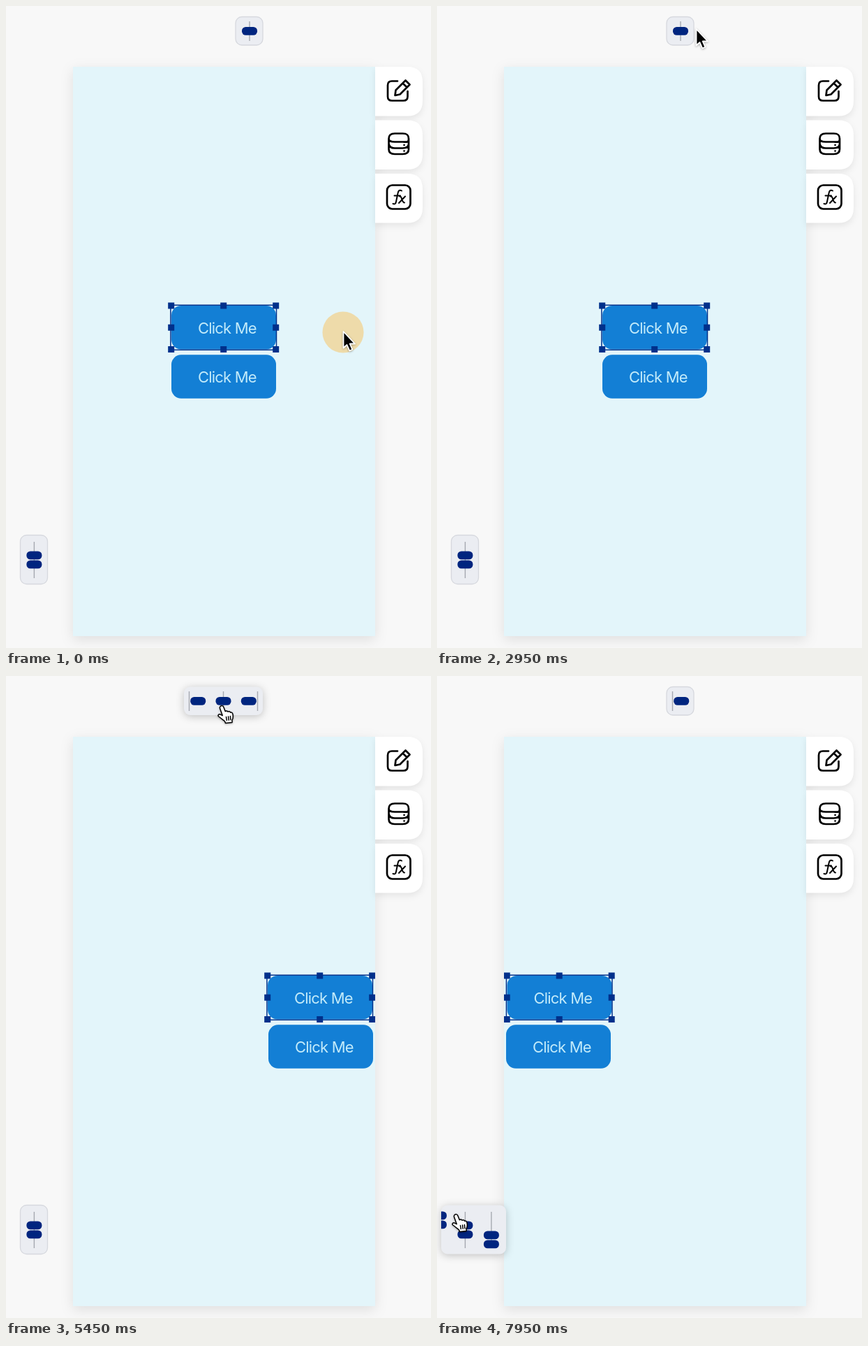
An HTML page that plays this animation: 609x919 px, repeating every 8000 ms.

```html
<!DOCTYPE html>
<html lang="en">
<head>
<meta charset="utf-8">
<style>
  html, body { margin: 0; width: 100%; height: 100%; overflow: hidden; background: #f8f8f8; }
  svg { display: block; width: 609px; height: 919px; }
  text { font: 22px Inter, Roboto, sans-serif; letter-spacing: -.8px; fill: #c3ebfa; }
  .page { fill: #e3f5fa; filter: drop-shadow(0 5px 9px #0000001a); }
  .tab { fill: #fff; filter: drop-shadow(0 4px 5px #00000014); }
  .icon { fill: none; stroke: #000; stroke-width: 2.7; stroke-linecap: round; stroke-linejoin: round; }
  .button { fill: #137fd5; }
  .mark { fill: none; stroke: #00308b; stroke-width: 1.5; }
  .grip { fill: #00308b; }
  .panel { fill: #ebedf2; }
  .panel.lift { filter: drop-shadow(0 2px 6px #00000038); }
  .panel.rest { stroke: #d6d8de; stroke-width: 1.3; }
  .guide { stroke: #a5a9b1; stroke-width: 1.4; }
  .pill { fill: #00257f; }
  #cursor { filter: drop-shadow(0 1.5px 1.5px #00000050); }
</style>
</head>
<body>
<svg viewBox="0 0 609 919">
  <clipPath id="pageClip"><rect x="96" y="87" width="433" height="815"/></clipPath>
  <rect class="page" x="96" y="87" width="433" height="815"/>
  <g id="tabs"></g>
  <g class="icon">
    <path d="M561 107.5H553Q547 107.5 547 113.500V129.500Q547 135.500 553 135.500H569.500Q575.500 135.500 575.500 129.500V122M557.500 128L558.500 120.500L572.500 106.500L578.500 112.500L564.500 126.500ZM568.500 110.500L574.500 116.500"/>
    <path d="M548.500 190C548.500 184 552 182.500 557 182.500H568.500C574 182.500 577 184 577 190S574 194.500 568.500 194.500H557C552 194.500 548.500 194 548.500 190V205C548.500 210 552 212 557 212H568.500C574 212 577 210 577 205V190M548.500 197C549 201.500 552 203.500 557 203.500H568.500C574 203.500 577 201.500 577 197M570.500 199h.1M570.500 207.500h.1"/>
    <rect x="546" y="256.500" width="33.500" height="34" rx="7.500"/>
    <path stroke-width="2" d="M567 264.500C563.500 262.500 562 265 561.500 268L559 280C558.500 283 557 284 554.500 283M556.500 271.500H565M564 272.500C567 271 567.500 282 571 281.500M572 272.500L563 282"/>
  </g>
  <g id="buttons"></g>
  <g id="selection" clip-path="url(#pageClip)"></g>
  <g id="top"></g>
  <g id="side"></g>
  <circle id="ripple" fill="#fac15c"/>
  <g id="cursor" stroke-linejoin="round" stroke-linecap="round">
    <path id="arrow" fill="#000" stroke="#fff" stroke-width="1.800" d="M.5-1V22.500L5.500 18L9.300 26.500L13.300 24.700L9.700 16.500H17Z"/>
    <g id="hand" transform="translate(-6 -1)" stroke="#000" stroke-width="1.500">
      <path fill="#fff" d="M4.200 1.500C6-.3 8 .6 8.800 2.500L11.200 8.600C12.500 7.600 14.300 8 14.900 9.200C16.300 8.300 18 8.800 18.600 10.200C20 9.600 21.500 10.500 21.800 12C22.600 15 22.800 18 21 21V24.500L11.500 25.500L10.600 23C7.500 20.500 4.500 18 1.800 16C.2 14.600 1.600 12.200 3.800 12.800L7.200 14.600L3.600 4.400C3.200 3.200 3.400 2.200 4.200 1.500Z"/>
      <path fill="none" d="M12.500 16.500L13.300 21.500M15.500 16L16.200 21.200M18.400 15.500L18.900 20.700"/>
    </g>
  </g>
</svg>
<script>
const $ = id => document.getElementById(id);
const LOOP = 8000;
const lerp = (a, b, u) => a + (b - a) * u;
const ease = u => u * u * (3 - 2 * u);
const rect = (cls, x, y, w, h, r = 0, extra = '') =>
  `<rect class="${cls}" x="${x}" y="${y}" width="${w}" height="${h}" rx="${r}" ${extra}/>`;
const guide = (x, y1, y2) => `<path class="guide" d="M${x} ${y1}V${y2}"/>`;
const pill = (x, y) => rect('pill', x - 11, y - 6, 22, 11.8, 5.5);

// Eased value of a [time, ...values] track
function track(keys, t) {
  const i = keys.findIndex(k => k[0] > t);
  if (i === 0) return keys[0].slice(1);
  if (i < 0) return keys.at(-1).slice(1);
  const a = keys[i - 1], b = keys[i], u = ease((t - a[0]) / (b[0] - a[0]));
  return a.slice(1).map((v, n) => lerp(v, b[n + 1], u));
}

const path = [
  [0, 483, 467], [1350, 483, 467], [1900, 363, 463], [2350, 363, 463],
  [2950, 371, 34], [3200, 356, 40], [3650, 356, 40], [4000, 380, 39],
  [4350, 380, 39], [4450, 381, 38], [4550, 381, 38], [5250, 309, 43],
  [6200, 309, 43], [6350, 303, 42], [6850, 303, 42], [7500, 27, 771]
];
const stripX = [
  [4290, 349], [4485, 311.5], [5930, 311.5], [6080, 349], [6880, 349], [7080, 386.5]
];
const topOpen = [
  [3050, 0], [3350, 1], [4300, 1], [4530, 0], [4800, 0], [5050, 1], [6950, 1], [7200, 0]
];
const sideOpen = [[7330, 0], [7600, 1]];
const clicks = [[-75, 483, 467], [2230, 363, 463], [4110, 380, 39], [5545, 311.5, 40], [6620, 304, 41]];
const handTimes = [[3080, 4380], [4780, 6970], [7420, LOOP]];

$('tabs').innerHTML = [87, 163.5, 240].map(y =>
  `<path class="tab" d="M529 ${y}h46q22 0 22 22v26.500q0 22-22 22h-46z"/>`).join('');

function panel(id, left, right, y, h, open, content) {
  const box = [left, y, right - left, h, 9];
  $(id).innerHTML =
    `<clipPath id="${id}Clip">${rect('', ...box)}</clipPath>` +
    rect('panel lift', ...box, `opacity="${open}"`) +
    rect('panel rest', ...box, `opacity="${1 - open}"`) +
    `<g clip-path="url(#${id}Clip)">${content}</g>`;
}

function drawPanels(t) {
  const [x] = track(stripX, t), [open] = track(topOpen, t);
  panel('top', lerp(329, x - 56.5, open), lerp(368, x + 56.5, open), 15.5, 40.5, open,
    [-49, 0, 49].map(d => guide(x + d, 22, 50)).join('') +
    [-36.3, 0, 36.3].map(d => pill(x + d, 36)).join(''));

  const [wide] = track(sideOpen, t);
  panel('side', lerp(20.5, 6, wide), lerp(59.5, 99, wide), 757.5, 70, wide,
    [-1, 0, 1].map(n => {
      const cx = 40.4 + 37.5 * n, cy = 793 + 14 * n;
      return guide(cx, 767, 819) + pill(cx, cy - 6.5) + pill(cx, cy + 6.5);
    }).join(''));
}

function frame(x, y, w, h, pad) {
  let s = rect('mark', x - pad, y - pad, w + 2 * pad, h + 2 * pad);
  for (const i of [0, .5, 1]) for (const j of [0, .5, 1])
    if (i !== .5 || j !== .5) s += rect('grip', x + w * i - 4.5, y + h * j - 4.5, 9, 9);
  return s;
}

function drawButtons(t) {
  const selected = t < 200 || t >= 2400;
  const [x1, x2] = t < 4290 ? [237, 237] : t < 5950 ? [375, 376] : t < 6880 ? [237, 237] : [100.5, 99];
  const button = (x, y) => rect('button', x, y, 150, 62.5, 14) +
    `<text x="${x + 38}" y="${y + 40}">Click Me</text>`;
  $('buttons').innerHTML = button(x1, 429) + button(x2, selected ? 499.3 : 498);
  $('selection').innerHTML = selected ? frame(x1 - .3, 429, 150, 62.5, .8)
    : t >= 1350 ? frame(95.5, 293.7, 432, 400.6, .6) : '';
}

function drawPointer(t) {
  const [x, y] = track(path, t);
  const isHand = handTimes.some(([a, b]) => t >= a && t < b);
  $('cursor').setAttribute('transform', `translate(${x} ${y})`);
  $('hand').style.display = isHand ? '' : 'none';
  $('arrow').style.display = isHand ? 'none' : '';

  const click = clicks.find(c => t >= c[0] && t < c[0] + 430);
  const set = (k, v) => $('ripple').setAttribute(k, v);
  if (!click) return set('r', 0);
  const age = t - click[0], rest = 1 - Math.min(1, age / 200);
  set('cx', click[1]);
  set('cy', click[2]);
  set('r', 48 * (1 - rest * rest));
  set('opacity', .5 * Math.min(1, (430 - age) / 230));
}

const start = performance.now();
function draw(now) {
  const t = Math.max(0, now - start) % LOOP;
  drawButtons(t);
  drawPanels(t);
  drawPointer(t);
  requestAnimationFrame(draw);
}
draw(start);
</script>
</body>
</html>
```
